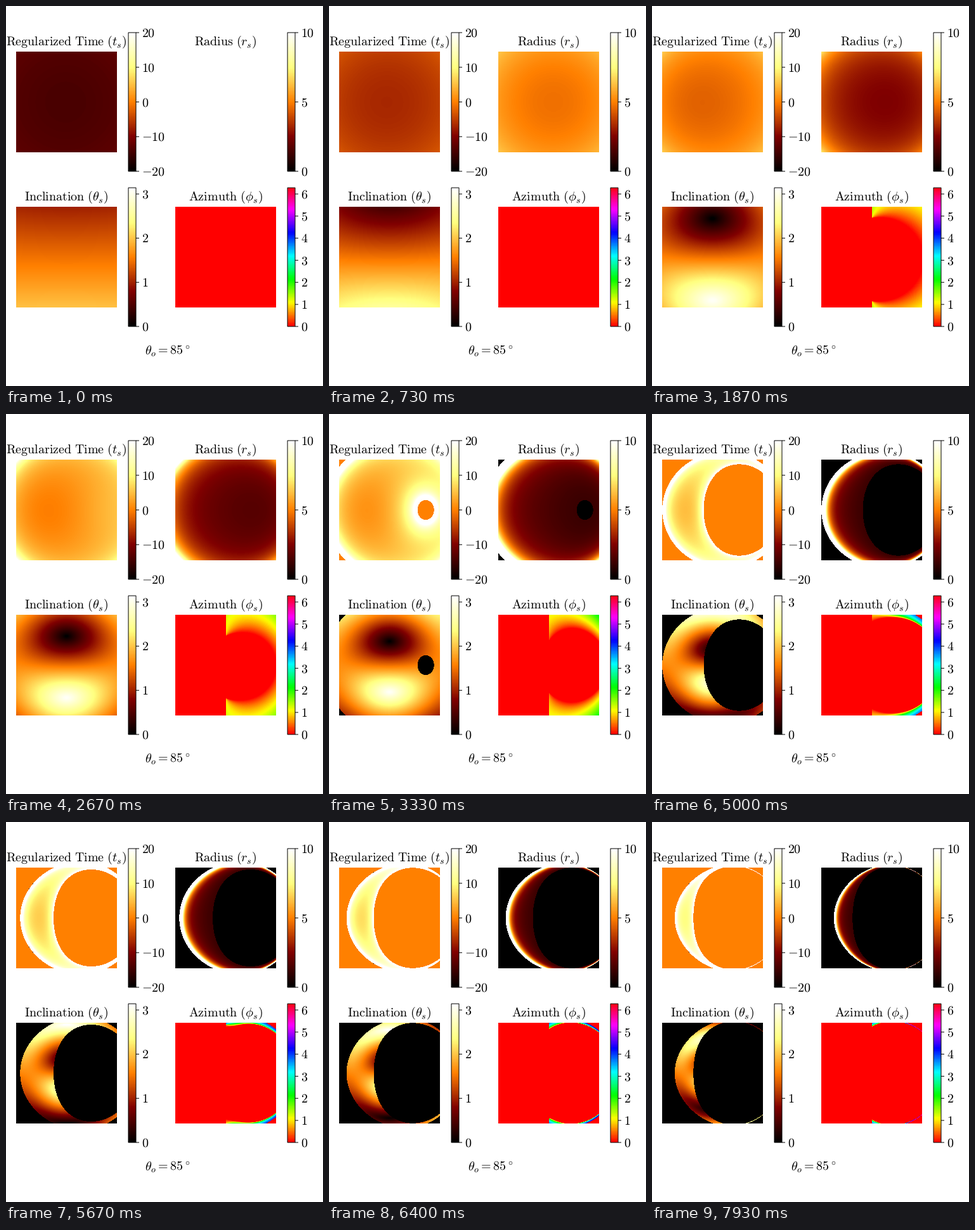
Write a matplotlib script that moves like this. It is 500 px wide and 600 px high and loops after 8 s.

```python
import numpy as np
import matplotlib.pyplot as plt
from matplotlib.animation import FuncAnimation
from matplotlib.patches import Rectangle

W, H, DPI = 500, 600, 100
POSES, FRAMES, LOOP_MS = 120, 200, 8000
SIDE, FOV = 159, 5.0                 # panel pixels, half width in units of mass
SPIN, INCL = 0.99, np.radians(85)
TAU0, DTAU = 0.1, 2.9 / 289          # Mino time of first pose, step per pose
HORIZON = 1 + np.sqrt(1 - SPIN**2)
THIN = 72 / DPI                      # one pixel in points

plt.rcParams["mathtext.fontset"] = "cm"
plt.rcParams["text.hinting"] = "none"

# Screen coordinates and conserved quantities of each ray
axis = (np.arange(SIDE) + 0.5) / SIDE * 2 * FOV - FOV
alpha, beta = np.meshgrid(axis - 1e-3, -axis)
cos_o, sin_o = np.cos(INCL), np.sin(INCL)
lam = -alpha * sin_o
eta = beta**2 + (alpha**2 - SPIN**2) * cos_o**2
P2 = SPIN**2 - lam**2 - eta
P3 = 2 * (eta + (lam - SPIN)**2)
P4 = -SPIN**2 * eta
K = eta + lam**2


def slope(s):
    """Mino-time derivative of (u=1/r, u', position, velocity, time, drag)."""
    u, v, x, y, z, vx, vy, vz = s[:8]
    q = np.maximum(u, 1e-3)
    r = 1 / q
    delta = np.maximum(r * r - 2 * r + SPIN**2, 1e-3)
    area = r * r + SPIN**2
    pull = K + 2 * SPIN**2 * z * z
    dt = area * (area - SPIN * lam) / delta + SPIN * (lam - SPIN * (1 - z * z))
    return np.array([
        v, P2 * u + 1.5 * P3 * u**2 + 2 * P4 * u**3,
        vx, vy, vz,
        -pull * x, -pull * y, (SPIN**2 - pull) * z,
        dt - v * r * r * (1 + 2 * q),
        SPIN * (2 * r - SPIN * lam) / delta,
    ])


def advance(s, span, steps):
    h = span / steps
    for _ in range(steps):
        a = slope(s)
        b = slope(s + h / 2 * a)
        c = slope(s + h / 2 * b)
        d = slope(s + h * c)
        s = s + h / 6 * (a + 2 * b + 2 * c + d)
    return s


def start(tau):
    u = np.full_like(alpha, tau) * (1 + P2 * tau**2 / 6)
    v = np.sqrt(1 + P2 * u**2 + P3 * u**3 + P4 * u**4)
    one = np.ones_like(u)
    s = np.array([u, v, sin_o * one, 0 * u, cos_o * one,
                  -cos_o * beta, alpha, sin_o * beta, 0 * u, 0 * u])
    # Carry the sphere motion over the first short stretch
    s[2:5] += tau * s[5:8]
    s[8] = slope(s)[8] * tau
    return s


def trace():
    s = start(0.005)
    s = advance(s, TAU0 - 0.005, 40)
    turn = np.arctan2(s[3], s[2])
    last = turn
    alive = np.ones(alpha.shape, bool)
    out = []
    for i in range(POSES):
        if i:
            s = advance(s, DTAU, 3)
            now = np.arctan2(s[3], s[2])
            turn = turn + (now - last + np.pi) % (2 * np.pi) - np.pi
            last = now
        alive &= (s[0] > 0) & (s[0] < 1 / HORIZON)
        s[0] = np.where(alive, s[0], 0.5)
        s[1] = np.where(alive, s[1], 0)
        r = 1 / s[0]
        t = s[8] - r - 2 * np.log(r)
        theta = np.arccos(np.clip(s[4], -1, 1))
        phi = turn - s[9] - np.pi / 2
        out.append([np.where(alive, g, 0).astype(np.float32)
                    for g in (t, r, theta, phi)])
    return out


fig = plt.figure(figsize=(W / DPI, H / DPI), dpi=DPI, facecolor="white")
ax = fig.add_axes([0, 0, 1, 1])
ax.axis("off")


def text(x, y, words, **kw):
    ax.text(x, y, words, fontsize=20 * THIN, color="black", **kw)


def picture(data, x, y, w, h, cmap, lo, hi):
    return ax.imshow(data, extent=(x, x + w, y + h, y), cmap=cmap, vmin=lo,
                     vmax=hi, aspect="auto", interpolation="nearest")


def panel(x, y, title, cmap, lo, hi, ticks, data):
    img = picture(data, x, y, SIDE, SIDE, cmap, lo, hi)
    text(x + SIDE / 2, y - 10, title, ha="center", va="baseline")
    bx, by, bw, bh = x + 177, y - 30, 12, 219
    picture(np.linspace(hi, lo, bh)[:, None], bx, by, bw, bh, cmap, lo, hi)
    ax.add_patch(Rectangle((bx, by), bw, bh, fill=False, ec="black",
                           lw=THIN, snap=False))
    for k in ticks:
        ty = by + (hi - k) / (hi - lo) * bh
        ax.plot([bx + bw, bx + bw + 5], [ty, ty], color="black", lw=THIN,
                snap=False, solid_capstyle="butt")
        text(bx + bw + 9, ty + 6.7, f"${k}$", ha="left", va="baseline")
    return img


views = trace()
specs = [
    (16, 72, r"$\mathrm{Regularized\ Time}\ (t_s)$", "afmhot", -20, 20,
     range(-20, 21, 10)),
    (267, 72, r"$\mathrm{Radius}\ (r_s)$", "afmhot", 0, 10, (0, 5, 10)),
    (16, 317, r"$\mathrm{Inclination}\ (\theta_s)$", "afmhot", 0, np.pi,
     range(4)),
    (267, 317, r"$\mathrm{Azimuth}\ (\phi_s)$", "hsv", 0, 2 * np.pi, range(7)),
]
images = [panel(*spec, data) for spec, data in zip(specs, views[0])]
text(255, 549, r"$\theta_o=85^\circ$", ha="center", va="baseline")
ax.set_xlim(0, W)
ax.set_ylim(H, 0)


def draw(i):
    pose = min(round(i * POSES / FRAMES), POSES - 1)
    for img, data in zip(images, views[pose]):
        img.set_data(data)
    return images


anim = FuncAnimation(fig, draw, frames=FRAMES, interval=LOOP_MS / FRAMES,
                     repeat=True, repeat_delay=0)
plt.show()
```
